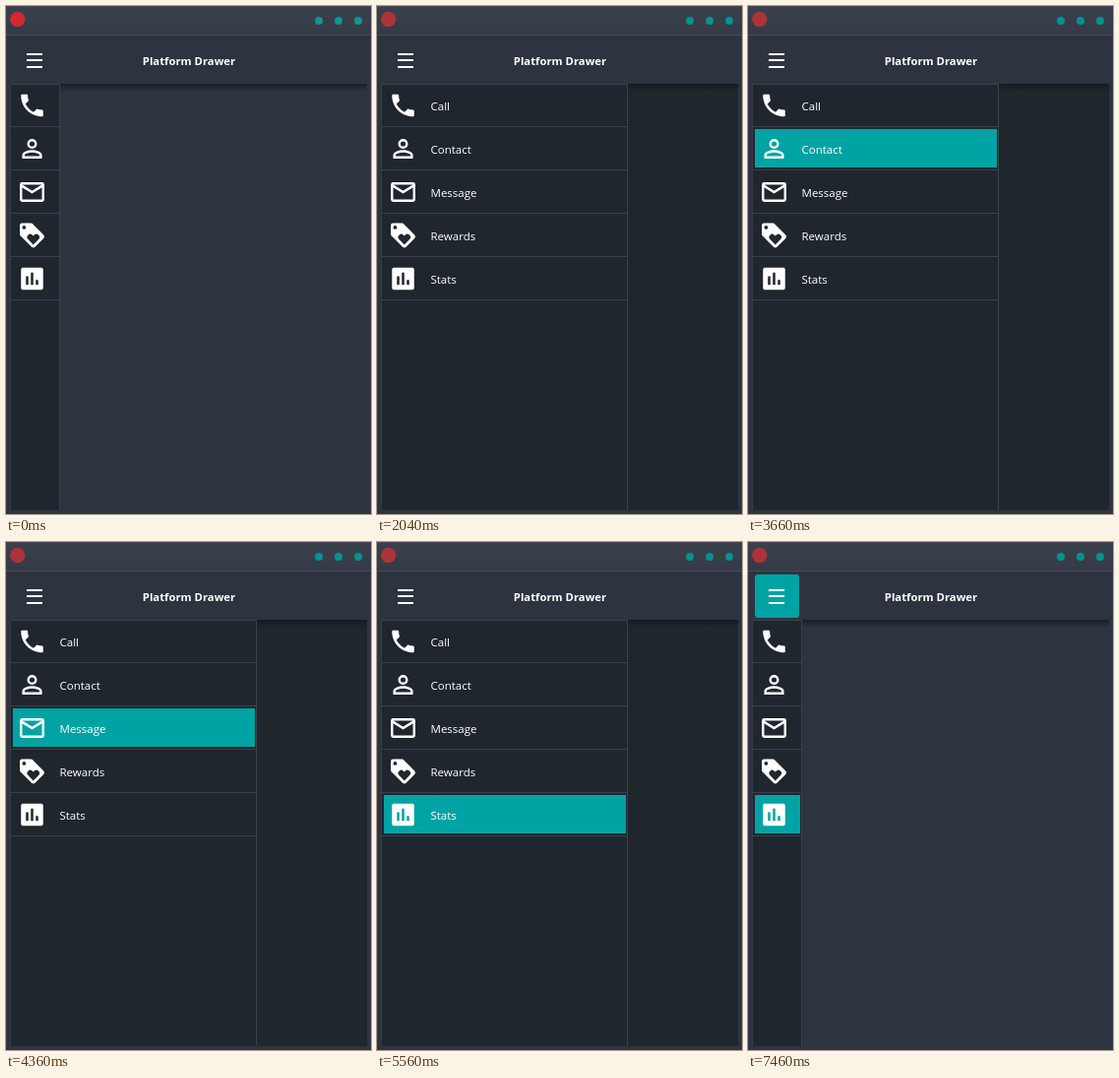
An HTML page for the animation above (8 s loop, 371 px wide and 516 px high).

```html
<!DOCTYPE html>
<html lang="en">
<head>
<meta charset="utf-8">
<title>Platform Drawer</title>
<style>
  html, body { margin: 0; width: 100%; height: 100%; overflow: hidden; background: #2d343f; }
  svg { display: block; width: 371px; height: 516px; }
  text { font: 11.5px "Open Sans", "Noto Sans", sans-serif; fill: #fff; }
  .title { font-size: 11.3px; font-weight: 700; text-anchor: middle; }
  .icon { fill: #fff; fill-rule: evenodd; }
  .line { fill: none; stroke: #fff; stroke-width: 1.95; }
</style>
</head>
<body>
<svg viewBox="0 0 371 516">
  <defs>
    <linearGradient id="bar" x2="0" y2="1">
      <stop stop-color="#3a414d"/><stop offset="1" stop-color="#343a46"/>
    </linearGradient>
    <linearGradient id="shade" x2="0" y2="1">
      <stop stop-color="#14181f" stop-opacity=".75"/><stop offset="1" stop-color="#14181f" stop-opacity="0"/>
    </linearGradient>
    <clipPath id="clip"><rect id="clipBox" x="5" y="79" width="50" height="433"/></clipPath>
  </defs>

  <rect width="371" height="516" fill="#2d343f"/>
  <rect width="371" height="30" fill="url(#bar)"/>
  <path d="M0 .5H371M0 29.5H371" stroke="#454c58"/>
  <path d="M.5 30V516M370.5 30V516" stroke="#353c48"/>
  <circle id="logo" cx="11.7" cy="13.5" r="7.7"/>
  <g id="dots">
    <circle cx="318" cy="15" r="4"/><circle cx="338" cy="15" r="4"/><circle cx="358" cy="15" r="4"/>
  </g>

  <rect id="button" x="7" y="33" width="45" height="44" rx="3"/>
  <path d="M21 49h16M21 55h16M21 62h16" stroke="#fff" stroke-width="2"/>
  <text class="title" x="186" y="60">Platform Drawer</text>

  <rect id="dim" x="5" y="79" width="362" height="433" fill="#1f262c"/>
  <rect x="5" y="79" width="362" height="8" fill="url(#shade)"/>

  <g clip-path="url(#clip)">
    <rect x="5" y="79" width="250" height="433" fill="#20262e"/>
    <path d="M5 79.5H255M5 122.5H255M5 166.5H255M5 210.5H255M5 254.5H255M5 298.5H255" stroke="#3a414c"/>
    <rect id="mark" x="7" height="39" fill="#00a3a3"/>
    <g id="labels"></g>
    <g transform="translate(11.5 86) scale(1.25)">
      <path class="icon" d="M6.62 10.79c1.44 2.83 3.76 5.14 6.59 6.59l2.2-2.2c.27-.27.67-.36 1.02-.24 1.12.37 2.33.57 3.57.57.55 0 1 .45 1 1V20c0 .55-.45 1-1 1-9.39 0-17-7.61-17-17 0-.55.45-1 1-1h3.5c.55 0 1 .45 1 1 0 1.25.2 2.45.57 3.57.11.35.03.74-.25 1.02z"/>
    </g>
    <g class="line" transform="translate(11.5 130) scale(1.25)">
      <circle cx="12" cy="8" r="3.05"/>
      <path d="M4.95 19.05V17C4.95 15.4 9.1 13.95 12 13.95S19.05 15.4 19.05 17V19.05Z"/>
    </g>
    <g class="line" transform="translate(11.5 174) scale(1.25)">
      <rect x="3" y="5" width="18" height="14" rx="1"/>
      <path d="M3 6.5L12 12.1 21 6.5"/>
    </g>
    <g transform="translate(11.5 218) scale(1.25)">
      <path class="icon" d="M21.4 11.6L12.4 2.6Q11.8 2 11 2H4Q2 2 2 4V11Q2 11.8 2.6 12.4L11.6 21.4Q13 22.6 14.4 21.4L21.4 14.4Q22.6 13 21.4 11.6ZM5.5 7a1.5 1.5 0 0 1 0-3 1.5 1.5 0 0 1 0 3ZM17.27 15.27L13 19.54 8.73 15.27A2.5 2.5 0 0 1 12.27 11.74L13 12.46 13.73 11.73A2.5 2.5 0 0 1 17.27 15.27Z"/>
    </g>
    <g transform="translate(11.5 262) scale(1.25)">
      <path class="icon" d="M4 3H20L21 4V20L20 21H4L3 20V4ZM7 10V17H9V10ZM11 7V17H13V7ZM15 13V17H17V13Z"/>
    </g>
  </g>
  <rect id="edge" y="79" width="1" height="433" fill="#3a414c"/>
  <path d="M4.5 79V512" stroke="#353c47"/>
</svg>
<script>
const LOOP = 8000;
const HOVER = "#00a3a3", PRESSED = "#0d7f84";
const $ = id => document.getElementById(id);
const set = (id, attrs) => {
  for (const name in attrs) $(id).setAttribute(name, attrs[name]);
};

$("labels").innerHTML = ["Call", "Contact", "Message", "Rewards", "Stats"]
  .map((label, i) => `<text x="54.5" y="${106 + 44 * i}">${label}</text>`).join("");

const buttonStates = [
  [0, "none"], [1080, HOVER], [1440, PRESSED], [1580, HOVER],
  [2040, "none"], [6070, HOVER], [7160, PRESSED], [7330, HOVER]
];
const rowStates = [[0, -1], [2690, 0], [3660, 1], [4360, 2], [5020, 3], [5560, 4]];
const stateAt = (states, t) => states.filter(s => s[0] <= t).pop()[1];

// Progress of a slide that advances in four even jumps
const slide = (t, start, step) =>
  Math.max(0, Math.min(1, (Math.floor((t - start) / step) + 1) / 4));

function render(t) {
  const open = slide(t, 1580, 63.3) - slide(t, 7330, 43.3);
  const width = 50 + 200 * open;
  const row = stateAt(rowStates, t);
  const early = t < 1440;
  set("logo", { fill: early ? "#cf2a30" : "#ad3338" });
  set("dots", { fill: early ? "#149494" : "#009292" });
  set("button", { fill: stateAt(buttonStates, t) });
  set("dim", { opacity: open });
  set("clipBox", { width });
  set("edge", { x: width + 4 });
  set("mark", { y: 81 + 44 * row, width: width - 4, opacity: row < 0 ? 0 : 1 });
}

const begin = performance.now();
function frame() {
  render((performance.now() - begin) % LOOP);
  requestAnimationFrame(frame);
}
frame();
</script>
</body>
</html>
```
